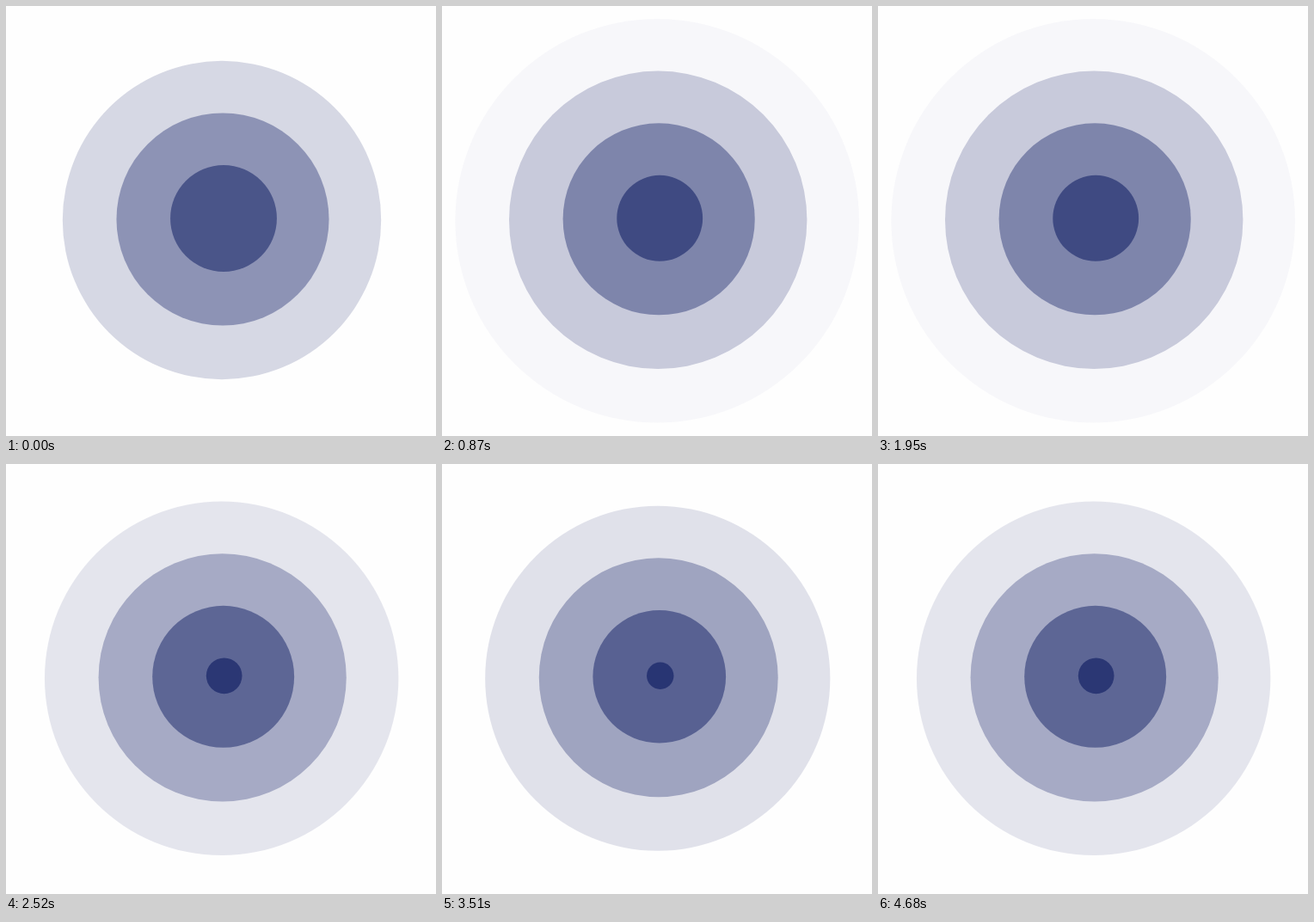
An HTML page with a canvas that plays this animation: 500 px wide and 500 px high, repeating every 4710 ms.

```html
<!DOCTYPE html>
<html>
<head>
<meta charset="utf-8">
<style>
  html, body { margin: 0; width: 100%; height: 100%; overflow: hidden; background: #fefefe; }
  canvas { display: block; }
</style>
</head>
<body>
<canvas id="stage" width="500" height="500"></canvas>
<script>
const ctx = document.getElementById('stage').getContext('2d');
const LOOP = 4710, STEP = 30, INTERVAL = 1080, RINGS = 4;
const mix = (a, b, p) => a + (b - a) * p;

// p runs from 0 (born at the centre) to 1 (fully grown and transparent)
function drawRing(p) {
  const [r, g, b] = [mix(32, 110, p), mix(46, 116, p), mix(110, 160, p)];
  ctx.fillStyle = `rgba(${r}, ${g}, ${b}, ${1 - p})`;
  ctx.beginPath();
  ctx.arc(mix(254, 250, p), mix(246, 250, p), 246.5 * p + 0.3, 0, Math.PI * 2);
  ctx.fill();
}

function draw(time) {
  const t = Math.floor((time % LOOP) / STEP) * STEP;
  const phase = (t % INTERVAL) / INTERVAL;
  ctx.fillStyle = '#fefefe';
  ctx.fillRect(0, 0, 500, 500);
  for (let i = RINGS - 1; i >= 0; i--) {
    const p = (i + phase) / RINGS;
    if (p > 0) drawRing(p);
  }
}

const start = performance.now();
function tick() {
  draw(performance.now() - start);
  requestAnimationFrame(tick);
}
tick();
</script>
</body>
</html>
```
